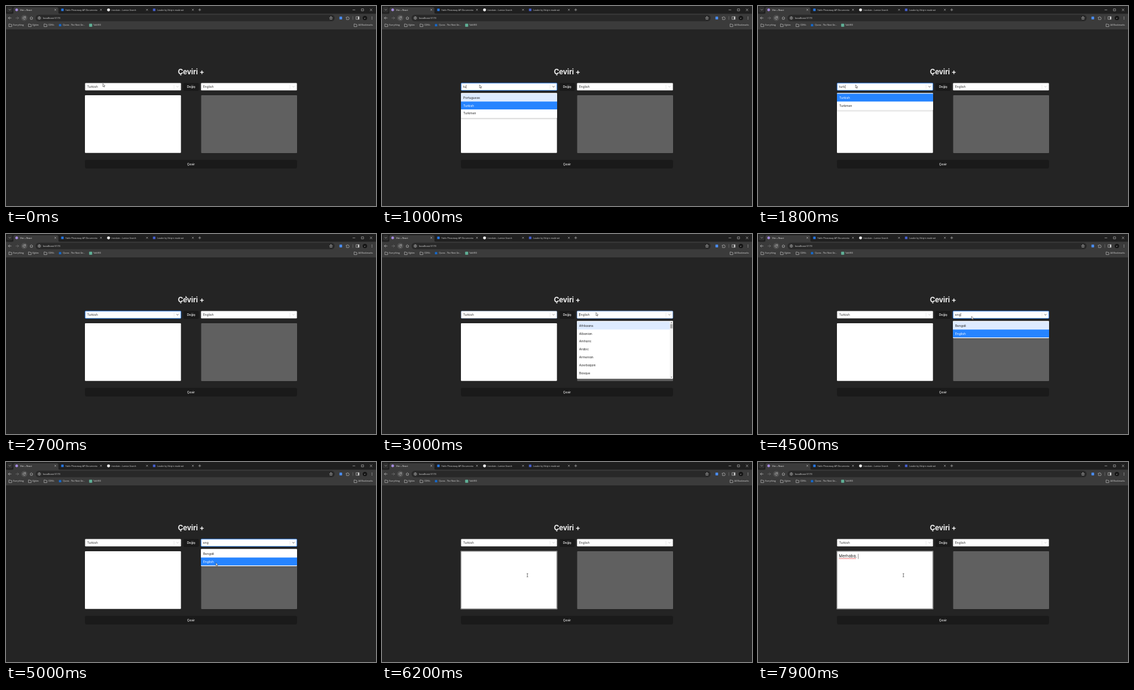
An HTML page that plays this animation: 600 px wide and 325 px high, repeating every 8 s.

```html
<!DOCTYPE html>
<html lang="tr">
<head>
<meta charset="utf-8">
<title>Çeviri +</title>
<style>
  html, body { margin: 0; width: 100%; height: 100%; overflow: hidden; background: #242424; }
  svg { display: block; width: 600px; height: 325px; }
  text { white-space: pre; }
  .ui { font-family: "Open Sans", "Noto Sans", sans-serif; }
  .app { font-family: Inter, "Noto Sans", sans-serif; font-feature-settings: "cv11"; }
  .line { fill: none; stroke: #c8c8c8; stroke-width: .6; stroke-linecap: round; stroke-linejoin: round; }
</style>
</head>
<body>
<svg viewBox="0 0 600 325" xmlns="http://www.w3.org/2000/svg">
  <defs>
    <filter id="shade" x="-10%" y="-10%" width="120%" height="130%">
      <feDropShadow dx="0" dy="1.2" stdDeviation="1" flood-opacity=".2"/>
    </filter>
  </defs>
  <g id="chrome"></g>
  <g id="page"></g>
  <g id="live"></g>
  <text id="ruler" class="app" visibility="hidden"></text>
</svg>
<script>
const LOOP = 8000, STEP = 100;
const LEFT = 128, RIGHT = 316, WIDTH = 156;
const ROW = 12.8, MENU_TOP = 141.2, MENU_MAX = 94, PAD = 1.25;
const $ = id => document.getElementById(id);

// ---------- drawing helpers ----------
const rect = (x, y, w, h, fill, r = 0, extra = "") =>
  `<rect x="${x}" y="${y}" width="${w}" height="${h}" rx="${r}" fill="${fill}" ${extra}/>`;
const dot = (x, y, r, fill) => `<circle cx="${x}" cy="${y}" r="${r}" fill="${fill}"/>`;
const line = (d, extra = "") => `<path class="line" d="${d}" ${extra}/>`;
const text = (cls, x, y, size, fill, str, extra = "") =>
  `<text class="${cls}" x="${x}" y="${y}" font-size="${size}" fill="${fill}" ${extra}>${str}</text>`;
const ui = (x, y, str, size = 3.5, fill = "#d6d6d6") => text("ui", x, y, size, fill, str);
const app = (x, y, str, size = 5, fill = "#333", extra = "") => text("app", x, y, size, fill, str, extra);
const cross = (x, y, r) => line(`M${x - r} ${y - r}l${2 * r} ${2 * r}m0 ${-2 * r}l${-2 * r} ${2 * r}`);
const folder = x => line(`M${x - 2.3} 33.2v-4h1.8l.7 .8h2.1v3.2z`);
const measure = (str, size) => {
  $("ruler").setAttribute("font-size", size);
  $("ruler").textContent = str;
  return str ? $("ruler").getComputedTextLength() : 0;
};

// ---------- browser frame ----------
function drawChrome() {
  const tabs = [
    [91.5, "#2577e3", "Fable Phraseway API Documenta", 154],
    [166.3, "#f2f2f2", "translate - Lumivo Search", 228.7],
    [240.3, "#4660d0", "Loader by Velqirn made wit", 303]
  ];
  $("chrome").innerHTML = [
    rect(0, 0, 600, 13, "#1f1f1f"),
    rect(0, 12.5, 600, 25.5, "#3b3b3b"),
    rect(1.5, 1.5, 9, 9, "#2f2f2f", 2.5),
    line("M4.8 5.5l1.3 1.3 1.3 -1.3"),
    `<path d="M9.5 13q2.5 0 2.5 -2.5v-6q0 -2.5 2.5 -2.5h68q2.5 0 2.5 2.5v6q0 2.5 2.5 2.5z" fill="#3b3b3b"/>`,
    dot(17.3, 6.3, 2.2, "#a58be0"),
    ui(22.8, 7.6, "Vite + React", 3.55, "#eee"),
    cross(80, 6.2, 1.1),
    ...tabs.map(([x, color, label, close], i) =>
      (i === 1 ? dot(x, 6.3, 2.4, color) : rect(x - 2, 4.3, 4, 4, color, .5)) +
      ui(x + 4.9, 7.6, label, 3.4) + cross(close, 6.2, 1.1)),
    line("M312.3 6.2h3.6M314.1 4.4v3.6"),
    line("M562.5 6.3h3.4"), line("M576.7 4.7h3.2v3.2h-3.2z"), cross(592, 6.3, 1.6),
    // toolbar
    line("M8.3 19.5h-4.4m2 -2l-2 2 2 2"),
    line("M16 19.5h4.4m-2 -2l2 2 -2 2", 'opacity=".45"'),
    dot(29.6, 19.5, 5, "#505050"),
    line("M31.3 18.4a2 2 0 1 0 .2 1.8M31.5 17.1v1.5h-1.5"),
    line("M39 19.4l2.2 -2 2.2 2M39.7 19v2.7h3v-2.7"),
    rect(48, 14.3, 485, 10.4, "#282828", 5.2),
    dot(54, 19.5, 3.6, "#3b3b3b"),
    line("M54 17.6a1.9 1.9 0 1 0 .01 0M54 19.4v1M54 18.5v.05"),
    ui(60, 21, "localhost:5173", 4.15, "#e4e4e4"),
    line("M527 17.2l.7 1.6 1.7 .2 -1.3 1.1 .4 1.7 -1.5 -.9 -1.5 .9 .4 -1.7 -1.3 -1.1 1.7 -.2z"),
    rect(540.7, 17.3, 4.4, 4.4, "#4a8cf0", .6),
    line("M552 18.3h1.2a.8 .8 0 0 1 1.6 0h1.2v1.2a.8 .8 0 0 1 0 1.5v1h-4v-1.2a.7 .7 0 0 0 0 -1.3z"),
    line("M562.5 17v5", 'opacity=".4"'),
    line("M568 17.3h4.6v4.4h-4.6z"), rect(570.7, 17.3, 1.9, 4.4, "#d8d8d8"),
    dot(582, 19.5, 3.6, "#151515"), ui(581.1, 20.7, "z", 3.4, "#eee"),
    ...[17.7, 19.5, 21.3].map(y => dot(593.5, y, .5, "#ccc")),
    // bookmarks
    folder(7), ui(11.6, 32.4, "Everything"),
    folder(38.7), ui(43, 32.4, "Eğitim"),
    folder(64), ui(68.4, 32.4, "CDN's"),
    rect(85.8, 29.2, 3.8, 3.8, "#1769c9", .5), ui(92.3, 32.4, "Quvra - The Next Ge..."),
    rect(134.8, 28.7, 5, 5, "#5fae95", .8), ui(141.6, 32.4, "TalkVEX"),
    folder(566.7), ui(571.6, 32.4, "All Bookmarks")
  ].join("");
}

// ---------- static page ----------
function drawPage() {
  const mid = 'text-anchor="middle" font-weight="500"';
  $("page").innerHTML = [
    rect(0, 38, 600, 287, "#242424"),
    app(300, 111.3, "Çeviri +", 11.5, "#f2f2f2", 'text-anchor="middle" font-weight="700" letter-spacing="-.1"'),
    rect(287.5, 125, 25.5, 13, "#1a1a1a", 2.4),
    app(300.2, 133.3, "Değiş", 5, "#f4f4f4", mid),
    rect(LEFT, 250, 344, 14, "#1a1a1a", 2.4),
    app(300, 258.8, "Çevir", 5, "#f4f4f4", mid),
    rect(RIGHT + .5, 145, 155.5, 94, "#606060", 1)
  ].join("");
}

// ---------- timeline ----------
const ALL = ["Afrikaans", "Albanian", "Amharic", "Arabic", "Armenian", "Azerbaijani", "Basque"];
const T_LIST = ["Catalan", "Croatian", "Dutch", "Esperanto", "Estonian", "Gujarati", "Haitian Creole"];
const E_LIST = ["Armenian", "Azerbaijani", "Basque", "Belarusian", "Bengali", "Burmese", "Cebuano"];
const EN_LIST = ["Armenian", "Bengali", "English", "French", "Slovenian", "Turkmen"];

// [time, typed text, visible rows, total rows]; no rows means the menu is closed
const leftKeys = [
  [300, "", ALL, 88],
  [700, "t", T_LIST, 27],
  [1000, "tu", ["Portuguese", "Turkish", "Turkmen"], 3],
  [1200, "tur", ["Turkish", "Turkmen"], 2],
  [1800, "turk", ["Turkish", "Turkmen"], 2],
  [1900, "", null, 0]
];
const rightKeys = [
  [3000, "", ALL, 88],
  [3500, "e", E_LIST, 42],
  [3900, "en", EN_LIST, 6],
  [4200, "eng", ["Bengali", "English"], 2],
  [5100, "", null, 0]
];
const WORD = "Merhaba";
const noteKeys = [
  [5700, ""],
  ...[...WORD].map((_, i) => [6500 + i * 100, WORD.slice(0, i + 1)]),
  [7500, WORD + ","],
  [7700, WORD + ", "]
];
const pointer = [
  [0, 157, 126], [100, 158.2, 128], [2200, 158.2, 128], [2400, 194, 109], [2600, 258, 89],
  [2800, 324, 111], [3000, 347, 127.6], [4400, 347, 127.6], [4700, 345, 146], [4900, 340.3, 163.5],
  [5100, 340.3, 163.5], [5200, 292, 162], [5300, 229, 167], [5400, 233, 178], [5500, 235.8, 184]
];

const latest = (keys, t) => keys.filter(k => k[0] <= t).pop();
const blink = (since, t) => Math.floor((t - since) / 500) % 2 === 0;

function pointerAt(t) {
  const i = pointer.findIndex(p => p[0] > t);
  if (i < 0) return pointer[pointer.length - 1].slice(1);
  const [t0, x0, y0] = pointer[i - 1], [t1, x1, y1] = pointer[i];
  const k = t1 - t0 > 100 || t0 > 0 ? (t - t0) / (t1 - t0) : 0;
  return [x0 + (x1 - x0) * k, y0 + (y1 - y0) * k];
}

// ---------- moving parts ----------
const caret = (x, y, h) => rect(x, y, .45, h, "#222");

function select(x, value, keys, from, to, t) {
  const key = latest(keys, t);
  const focused = t >= from && t < to;
  const fading = t === from || t === to;
  const border = fading ? "#7fb2f8" : focused ? "#2684ff" : "#ccc";
  const arrow = fading ? "#888" : focused ? "#444" : "#c4c4c4";
  const typed = focused && key ? key[1] : "";
  const tx = x + 3.6;
  let out = rect(x + .3, 125.2, WIDTH - .6, 11.9, "#fff", 1.2,
    `stroke="${border}" stroke-width="${focused ? .8 : .35}"`);
  out += app(tx, 132.8, typed || value);
  out += rect(x + 144.3, 127.6, .35, 7, "#ccc");
  out += `<path d="M${x + 148.4} 130.3l1.7 1.6 1.7 -1.6" fill="none" stroke="${arrow}" stroke-width=".75"/>`;
  if (focused && key && blink(key[0], t)) out += caret(tx + measure(typed, 5) + .2, 128, 6);
  return out;
}

function menu(x, value, keys, t, pointerY) {
  const key = latest(keys, t);
  if (!key || !key[2]) return "";
  const [, , rows, total] = key;
  const h = Math.min(MENU_MAX, total * ROW + 2 * PAD);
  const scrolls = total > 7;
  const w = scrolls ? WIDTH - 5.2 : WIDTH;
  const hover = Math.floor((pointerY - MENU_TOP - PAD) / ROW);
  const active = Math.max(0, Math.min(hover, rows.length - 1));
  let out = rect(x, MENU_TOP, WIDTH, h, "#fff", 1.2,
    'filter="url(#shade)" stroke="#000" stroke-opacity=".1" stroke-width=".3"');
  rows.forEach((name, i) => {
    const y = MENU_TOP + PAD + i * ROW;
    const chosen = name === value;
    if (chosen || i === active) out += rect(x, y, w, ROW, chosen ? "#2684ff" : "#deebff");
    out += app(x + 3.8, y + 8.3, name, 5, chosen ? "#fff" : "#242424");
  });
  if (scrolls) {
    const sx = x + w, bottom = MENU_TOP + h;
    const thumb = Math.max(6, (h - 10) * h / (total * ROW + 2 * PAD));
    out += rect(sx, MENU_TOP + .2, 5.1, h - .4, "#f1f1f1", .8);
    out += rect(sx + .6, MENU_TOP + 5.2, 3.9, thumb, "#a8a8a8");
    out += `<path d="M${sx + 1.4} ${MENU_TOP + 3.3}h2.4l-1.2 -1.4zM${sx + 1.4} ${bottom - 3.3}h2.4l-1.2 1.4z" fill="#555"/>`;
  }
  return out;
}

function note(t) {
  const key = latest(noteKeys, t);
  const focused = t >= 5600;
  let out = "";
  if (focused) out += rect(127.3, 144.3, 157.2, 95.2, "#a8a8a8", 1.3);
  out += rect(LEFT, 145, 155.7, 93.8, "#fff", 1,
    focused ? 'stroke="#1c1c1c" stroke-width=".6"' : "");
  if (!key) return out;
  const x = 131.3, size = 6.25, str = key[1];
  out += app(x, 155.2, str, size, "#1a1a1a");
  if (t >= 7600) {
    const n = Math.round(measure(WORD, size) / 1.25);
    out += `<path d="M${x} 156.9${"q.31 -.9 .62 0t.63 0".repeat(n)}" fill="none" stroke="#e03030" stroke-width=".55"/>`;
  }
  if (blink(key[0], t)) out += caret(x + measure(str, size) + .3, 149.2, 8.3);
  return out;
}

function cursor(x, y, t) {
  if (t >= 5300)
    return `<path d="M${x - 1.2} ${y - 2.8}q1.2 0 1.2 .6q0 -.6 1.2 -.6M${x} ${y - 2.2}v4.4M${x - 1.2} ${y + 2.8}q1.2 0 1.2 -.6q0 .6 1.2 .6" fill="none" stroke="#222" stroke-width=".6"/>`;
  return `<path d="M${x} ${y}v5.1l1.15 -1.05 .75 1.75 .85 -.36 -.75 -1.7h1.55z" fill="#fff" stroke="#111" stroke-width=".45" stroke-linejoin="round"/>`;
}

let shown = -1;
function render(t) {
  if (t === shown) return;
  shown = t;
  const [x, y] = pointerAt(t);
  $("live").innerHTML =
    note(t) +
    select(LEFT, "Turkish", leftKeys, 300, 3000, t) +
    select(RIGHT, "English", rightKeys, 3000, 5600, t) +
    menu(LEFT, "Turkish", leftKeys, t, y) +
    menu(RIGHT, "English", rightKeys, t, y) +
    cursor(x, y, t);
}

drawChrome();
drawPage();
const start = performance.now();
function tick() {
  const t = (performance.now() - start) % LOOP;
  render(Math.floor(t / STEP) * STEP);
  requestAnimationFrame(tick);
}
tick();
</script>
</body>
</html>
```
